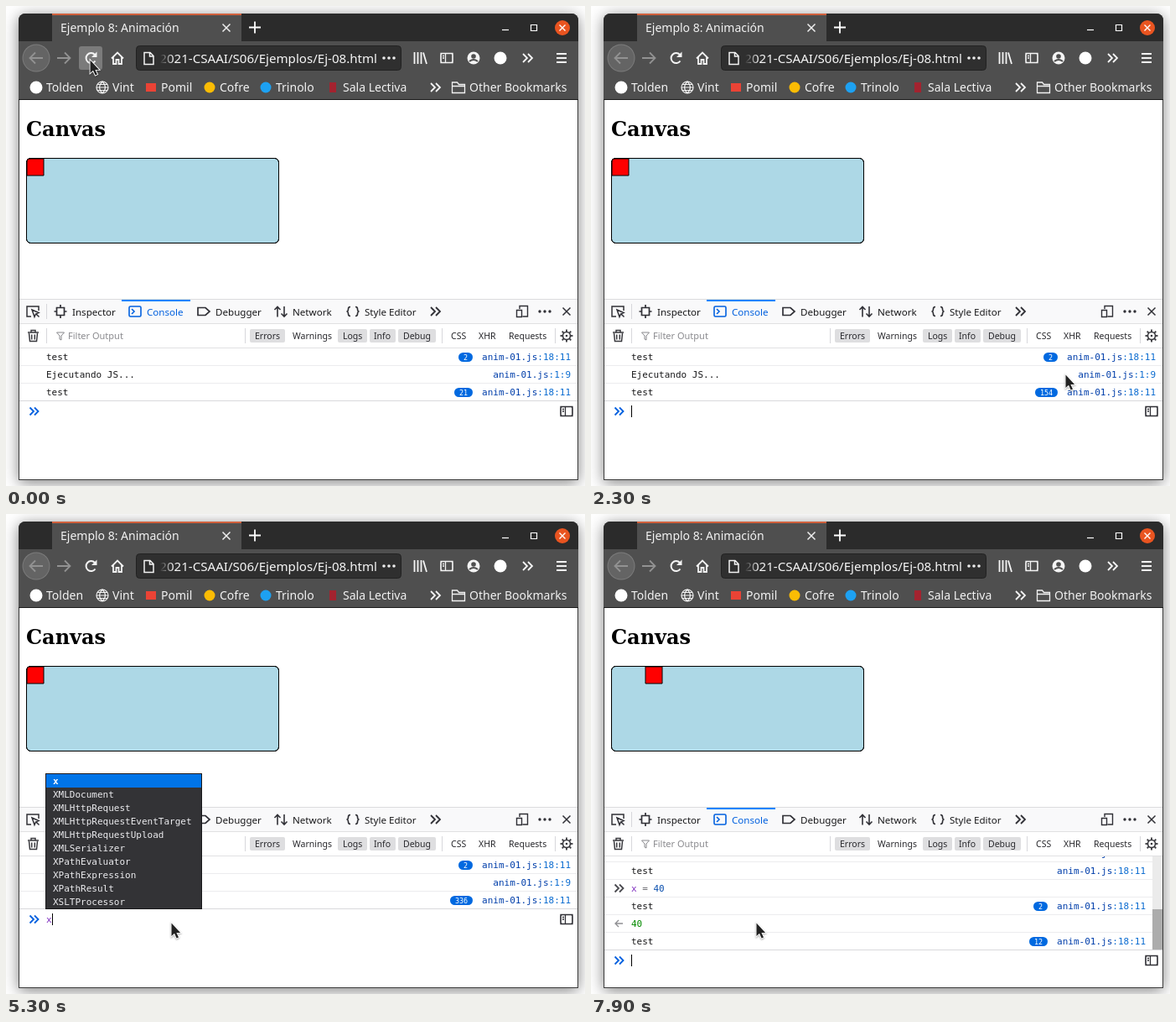
Recreate the animation shown at these times as an HTML page with a canvas. Size 691 by 572 pixels, loop 8 s.

```html
<!DOCTYPE html>
<html lang="es">
<head>
<meta charset="utf-8">
<title>Canvas</title>
<style>
html, body { margin: 0; width: 100%; height: 100%; overflow: hidden; background: #fff; }
canvas { display: block; }
</style>
</head>
<body>
<canvas id="stage" width="691" height="572"></canvas>
<script>
const stage = document.getElementById('stage');
let ctx = stage.getContext('2d');

const SANS = '"Noto Sans", "Open Sans", sans-serif';
const MONO = '"DejaVu Sans Mono", monospace';
const CHAR = 6.62;
const STEP = 100, STEPS = 80, ENTER = 76;
const HOLDS = [5, 10, 40, 46, 59, 64, 75];
const KEYS = [[51, 'x'], [57, ' '], [61, '='], [69, ' '], [71, '4'], [72, '0']];
const MOUSE = [
  [5, 100, 64], [6, 112, 92], [9, 310, 317], [13, 415, 500], [14, 421, 507], [17, 421, 507],
  [19, 450, 468], [23, 566, 439], [25, 564, 440], [28, 511, 471], [30, 511, 471],
  [33, 350, 480], [36, 205, 488], [37, 197, 488]
];
const SUGGESTIONS = ['x', 'XMLDocument', 'XMLHttpRequest', 'XMLHttpRequestEventTarget',
  'XMLHttpRequestUpload', 'XMLSerializer', 'XPathEvaluator', 'XPathExpression',
  'XPathResult', 'XSLTProcessor'];

function rect(x, y, w, h, color) {
  ctx.fillStyle = color;
  ctx.fillRect(x, y, w, h);
}
function box(x, y, w, h, r, fill, edge) {
  ctx.beginPath();
  ctx.roundRect(x, y, w, h, r);
  if (fill) { ctx.fillStyle = fill; ctx.fill(); }
  if (edge) { ctx.strokeStyle = edge; ctx.lineWidth = 1; ctx.stroke(); }
}
function disc(x, y, r, fill) {
  ctx.beginPath();
  ctx.arc(x, y, r, 0, 7);
  ctx.fillStyle = fill;
  ctx.fill();
}
function path(d, color, width = 1.5) {
  ctx.strokeStyle = color;
  ctx.lineWidth = width;
  ctx.stroke(new Path2D(d));
}
function text(s, x, y, size, color, family = SANS, align = 'left', weight = '') {
  ctx.font = `${weight} ${size}px ${family}`;
  ctx.textAlign = align;
  ctx.fillStyle = color;
  ctx.fillText(s, x, y);
}
const code = (s, x, y, color) => text(s, x, y, 11, color, MONO);
const chevrons = (x, y, color, s = 5) =>
  path(`M${x - s} ${y - s}l${s} ${s}l${-s} ${s}M${x + 1} ${y - s}l${s} ${s}l${-s} ${s}`, color, 1.8);
const cross = (x, y, s, color, w = 1.5) =>
  path(`M${x - s} ${y - s}l${2 * s} ${2 * s}M${x + s} ${y - s}l${-2 * s} ${2 * s}`, color, w);
function dots(x, y, gap, r, color) {
  for (let i = -1; i < 2; i++) disc(x + i * gap, y, r, color);
}
function sidebar(x, y, color) {
  box(x - 7, y - 5.5, 14, 11, 2, null, color);
  path(`M${x - 7} ${y - 5.5}h14v11h-14zM${x - 1.5} ${y - 5}v10M${x - 5} ${y - 2.5}h2M${x - 5} ${y}h2`, color, 1.3);
}

function titleBar() {
  rect(15, 20, 668, 22, '#2b2b2b');
  box(15, 9, 668, 33, [8, 8, 0, 0], '#2b2b2b');
  rect(55, 9, 226, 33, '#4f4f4f');
  rect(55, 9, 226, 2, '#d0603c');
  text('Ejemplo 8: Animación', 65, 31, 14, '#f2f2f2');
  cross(263, 26, 4.5, '#eee');
  path('M290 25.5h14M297 18.5v14', '#fff', 1.8);
  path('M592 28.5h8', '#fff', 1.2);
  path('M626.5 22.5h7v7h-7z', '#fff', 1.2);
  disc(664, 26, 9, '#e95420');
  cross(664, 26, 3.5, '#fff', 1.4);
}

function navBar() {
  const ink = '#f4f4f4', dim = '#929292';
  rect(15, 42, 668, 69, '#4f4f4f');
  rect(15, 111, 668, 1, '#1c1c1c');
  disc(36, 62, 16.5, '#7c7c7c');
  disc(36, 62, 15.5, '#646464');
  path('M44 62H29M35 55.5l-6.5 6.5l6.5 6.5', dim, 1.8);
  path('M61 62h15M70 55.5l6.5 6.5l-6.5 6.5', dim, 1.8);
  path('M126 62.5l7 -7l7 7M128 61v8h3.500v-5h3v5h3.500v-8', ink, 1.8);

  box(155.5, 47.5, 316, 29, 4, '#2f2f2f', '#222');
  path('M165 55.500h7l4 4v10h-11zM171.500 56v4h4', ink, 1.5);
  ctx.save();
  ctx.beginPath();
  ctx.rect(184, 50, 262, 25);
  ctx.clip();
  text('2021-CSAAI/S06/Ejemplos/Ej-08.html', 443, 68, 15.1, '#f6f6f6', SANS, 'right');
  ctx.restore();
  const fade = ctx.createLinearGradient(184, 0, 200, 0);
  fade.addColorStop(0, '#2f2f2f');
  fade.addColorStop(1, '#2f2f2f00');
  rect(183, 50, 18, 24, fade);
  dots(457, 62, 6, 1.8, '#eee');

  path('M487.500 55v14M491.500 55v14M495.500 55v14M498 55.500l4 13.500', ink, 1.8);
  sidebar(526, 62, ink);
  disc(558, 62, 7.5, ink);
  disc(558, 60, 2.8, '#4f4f4f');
  path('M553 66q5 -4 10 0', '#4f4f4f', 2);
  disc(590, 62, 7.5, '#fff');
  chevrons(622, 62, ink);
  path('M657 57h12M657 62h12M657 67h12', ink, 1.8);
}

function bookmarks() {
  const label = (s, x) => text(s, x, 102, 14, '#f2f2f2');
  disc(36, 97, 7.5, '#fff');
  label('Tolden', 48);
  path('M108 97a7 7 0 1 0 14 0a7 7 0 1 0 -14 0h14M115 90q-7 7 0 14q7 -7 0 -14M109.500 93.500h11M109.500 100.500h11', '#f2f2f2', 1.2);
  label('Vint', 127);
  rect(167, 92, 12, 10, '#ea4335');
  label('Pomil', 185);
  disc(243, 97, 6.5, '#fbbc04');
  label('Cofre', 255);
  disc(310, 97, 6.5, '#1da1f2');
  label('Trinolo', 322);
  rect(386, 91, 8, 12, '#a3232f');
  label('Sala Lectiva', 402);
  chevrons(512, 97, '#f2f2f2');
  path('M532.500 91h6l2 2.500h7v10h-15zM533 95.500h14', '#f2f2f2', 1.3);
  label('Other Bookmarks', 553);
}

function toolTabs() {
  const ink = '#303036', blue = '#0060df';
  const tab = (s, x, color = '#18181a') => text(s, x, 369, 11.6, color);
  rect(16, 349, 666, 1, '#dcdcde');
  rect(16, 350, 666, 28, '#f9f9fa');
  rect(16, 378, 666, 1, '#e0e0e2');
  rect(138, 350, 82, 2, '#0a84ff');
  rect(48, 355, 1, 18, '#d7d7db');
  path('M30 370h-5v-12h14v5M31 362l8 3.500l-3.500 1.500l-1.500 3.500zM36 367l3.500 3.500', ink);
  path('M60.500 359.500h9v9h-9zM65 356v3M65 369v3M57.500 364h3M69.500 364h3', ink, 1.7);
  tab('Inspector', 79);
  path('M148.500 358h11q1.500 0 1.500 1.500v9q0 1.500 -1.500 1.500h-11q-1.500 0 -1.500 -1.500v-9q0 -1.500 1.500 -1.500zM150 361l3 3l-3 3', blue, 1.6);
  tab('Console', 168, blue);
  path('M229 359.500h9l5 4.500l-5 4.500h-9z', ink, 1.7);
  tab('Debugger', 250);
  path('M324 370.500v-12M320.500 362l3.500 -3.500l3.500 3.500M332 358v12M328.500 366.500l3.500 3.500l3.500 -3.500', ink, 1.6);
  tab('Network', 342);
  path('M411 358.500q-2.500 0 -2.500 2.500q0 3 -2 3q2 0 2 3q0 2.500 2.500 2.500M417 358.500q2.500 0 2.500 2.500q0 3 2 3q-2 0 -2 3q0 2.500 -2.500 2.500', ink, 1.6);
  tab('Style Editor', 428);
  chevrons(512, 364, ink);
  path('M613 361v-3.500h9.500v12.500h-6M609.500 362.500h6v8h-6z', ink, 1.4);
  dots(643, 364, 6, 1.7, ink);
  cross(669, 364, 4.5, ink);
}

function filterBar() {
  const ink = '#38383d';
  const label = (s, x) => text(s, x, 397, 10.5, '#29292d');
  rect(16, 407, 666, 1, '#e0e0e2');
  path('M26 389h13M30 388.500v-2h5v2M27.500 390l1 9.500h8l1 -9.500M30.700 391.500v6M34.300 391.500v6', ink);
  for (const x of [48, 285, 520, 655]) rect(x, 384, 1, 18, '#d7d7db');
  path('M60.500 389h9l-3.500 4v5l-2 -1v-4z', '#88888c', 1);
  text('Filter Output', 74, 397, 11, '#8b8b8f');
  for (const [x, w] of [[291, 42], [396, 35], [434, 31], [468, 45]]) box(x, 385, w, 16, 2, '#dedee0');
  label('Errors', 297);
  label('Warnings', 342);
  label('Logs', 402);
  label('Info', 439);
  label('Debug', 474);
  label('CSS', 531);
  label('XHR', 564);
  label('Requests', 600);
  for (let i = 0; i < 8; i++) {
    const a = i * Math.PI / 4, c = Math.cos(a), s = Math.sin(a);
    path(`M${669 + 4.5 * c} ${393 + 4.5 * s}L${669 + 7.5 * c} ${393 + 7.5 * s}`, ink, 1.8);
  }
  path('M664.500 393a4.500 4.500 0 1 0 9 0a4.500 4.500 0 1 0 -9 0', ink, 1.6);
  disc(669, 393, 1.3, ink);
}

function drawBackdrop() {
  rect(0, 0, 691, 572, '#fff');
  ctx.save();
  ctx.shadowColor = 'rgba(0,0,0,.5)';
  ctx.shadowBlur = 18;
  ctx.shadowOffsetY = 3;
  box(15, 9, 668, 556, [8, 8, 0, 0], '#3a3a3a');
  ctx.restore();
  rect(16, 112, 666, 452, '#fff');
  titleBar();
  navBar();
  bookmarks();
  text('Canvas', 24, 155, 24, '#000', '"DejaVu Serif", serif', 'left', 'bold');
  toolTabs();
  filterBar();
}

function drawReload(hover) {
  if (hover) box(87, 48, 28, 28, 3, '#7b7b7b');
  path('M106.500 65.500a6 6 0 1 1 -0.500 -7.500', '#f4f4f4', 2);
  ctx.fillStyle = '#f4f4f4';
  ctx.fill(new Path2D('M108.500 54.500v6.500h-6.500z'));
}

function drawScene(x) {
  box(24.5, 181.5, 301, 101, 5, '#add8e6', '#000');
  ctx.save();
  ctx.beginPath();
  ctx.roundRect(24, 181, 302, 102, 5);
  ctx.clip();
  rect(25 + x, 182, 20, 20, '#f00');
  path(`M${25 + x} 182h20v20h-20z`, '#000', 1);
  ctx.restore();
  box(24.5, 181.5, 301, 101, 5, null, '#000');
}

function source(place, right, y) {
  const left = right - (10 + place.length) * CHAR;
  code('anim-01.js', left, y, '#003eaa');
  code(place, left + 10 * CHAR, y, '#0a6bd0');
}
function badge(n, right, y) {
  const w = 12 + 5 * String(n).length;
  box(right - w, y - 9, w, 11, 5.5, '#0069e0');
  text(n, right - w / 2, y, 8.4, '#fff', MONO, 'center');
}
function logRow(s, y, right, place, n) {
  code(s, 48, y, '#18181a');
  source(place, right, y);
  if (n > 1) badge(n, right - 117, y);
}
function rowLine(y, right) {
  rect(16, y, right - 16, 1, '#ececee');
}

function expression(s, y) {
  const color = { x: '#8030c0', '=': '#66666b' };
  [...s].forEach((c, i) => code(c, 48 + i * CHAR, y, color[c] || '#0a4fae'));
}

function countAt(k) {
  k = Math.max(k, 1);
  return Math.floor(k <= 53 ? 21.2 + 6.07 * (k - 1) : 336.5 + 6.2 * (k - 53));
}

function drawLog(k) {
  if (k < ENTER) {
    for (const y of [428, 449]) rowLine(y, 682);
    logRow('test', 422, 674, ':18:11', 2);
    logRow('Ejecutando JS...', 443, 674, ':1:9');
    logRow('test', 464, 674, ':18:11', countAt(k));
    rect(16, 470, 666, 1, '#d9d9dc');
    return;
  }
  ctx.save();
  ctx.beginPath();
  ctx.rect(16, 408, 666, 112);
  ctx.clip();
  for (let y = 414; y < 519; y += 21) rowLine(y, 670);
  logRow('test', 408, 662, ':18:11');
  logRow('test', 429, 662, ':18:11');
  chevrons(33, 446, '#4a4a4f', 4.5);
  expression('x = 40', 450);
  logRow('test', 471, 662, ':18:11', 2);
  path('M38 488h-9M33 484l-4 4l4 4', '#909094', 1.4);
  code('40', 48, 492, '#058b00');
  logRow('test', 513, 662, ':18:11', 6 * (k - 77));
  rect(670, 408, 12, 111, '#ebebeb');
  rect(670, 471, 12, 48, '#acacac');
  ctx.restore();
  rect(16, 519, 666, 1, '#d9d9dc');
}

function drawInput(k) {
  const y = k < ENTER ? 483 : 532;
  const keys = k < ENTER ? KEYS.filter(([at]) => at <= k) : [];
  const since = k >= ENTER ? ENTER : keys.length ? keys[keys.length - 1][0] : 9;
  chevrons(33, y, '#0060df', 4.5);
  sidebar(669, y, '#303036');
  expression(keys.map(key => key[1]).join(''), y + 4);
  const lit = k >= since && Math.floor((k - since) / 5) % 2 === 0;
  if (lit) rect(48 + Math.round(keys.length * CHAR), y - 7, 1, 14, '#000');
}

function drawPopup() {
  rect(47, 309, 187, 162, '#18181a');
  rect(48, 310, 185, 160, '#333336');
  rect(48, 310, 185, 16, '#0074e8');
  SUGGESTIONS.forEach((s, i) =>
    text(s, 56, 322 + 16 * i, 11, i ? '#ededf0' : '#fff', MONO, 'left', i ? '' : 'bold'));
}

function mouseAt(k) {
  let a = MOUSE[0];
  for (const b of MOUSE) {
    if (k <= b[0]) {
      const f = b === a ? 0 : Math.max(0, (k - a[0]) / (b[0] - a[0]));
      return [a[1] + (b[1] - a[1]) * f, a[2] + (b[2] - a[2]) * f];
    }
    a = b;
  }
  return [a[1], a[2]];
}

function drawMouse(k) {
  let [x, y] = mouseAt(k).map(Math.round);
  if ((k > 30 && k < 51) || (k > 61 && k < ENTER)) {
    const d = `M${x - 3} ${y - 7.5}h2.500l.5 .5l.5 -.5h2.500M${x} ${y - 7}v14M${x - 3} ${y + 7.5}h2.500l.5 -.5l.5 .5h2.500`;
    path(d, '#fff', 2.6);
    path(d, '#222', 1.1);
    return;
  }
  if (k > 50) y = 487;
  const arrow = new Path2D(`M${x + .5} ${y + .5}v15.500l3.500 -3.200l2.600 5.700l2.400 -1.100l-2.600 -5.500h4.700z`);
  ctx.save();
  ctx.shadowColor = 'rgba(0,0,0,.35)';
  ctx.shadowBlur = 2;
  ctx.shadowOffsetY = 1;
  ctx.strokeStyle = '#fff';
  ctx.lineWidth = 1.8;
  ctx.stroke(arrow);
  ctx.restore();
  ctx.fillStyle = '#222';
  ctx.fill(arrow);
}

// The unchanging window is painted once.
const screen = ctx;
const backdrop = document.createElement('canvas');
backdrop.width = stage.width;
backdrop.height = stage.height;
ctx = backdrop.getContext('2d');
drawBackdrop();
ctx = screen;

function draw(k) {
  ctx.drawImage(backdrop, 0, 0);
  drawReload(k < 6);
  drawScene(k < ENTER ? 0 : 40);
  drawLog(k);
  drawInput(k);
  if (k >= 52 && k < 57) drawPopup();
  drawMouse(k);
}

const start = performance.now();
let shown = -1;
function tick() {
  let k = Math.floor((performance.now() - start) / STEP) % STEPS;
  if (HOLDS.includes(k)) k--;
  if (k !== shown) draw(shown = k);
  requestAnimationFrame(tick);
}
draw(0);
tick();
</script>
</body>
</html>
```
